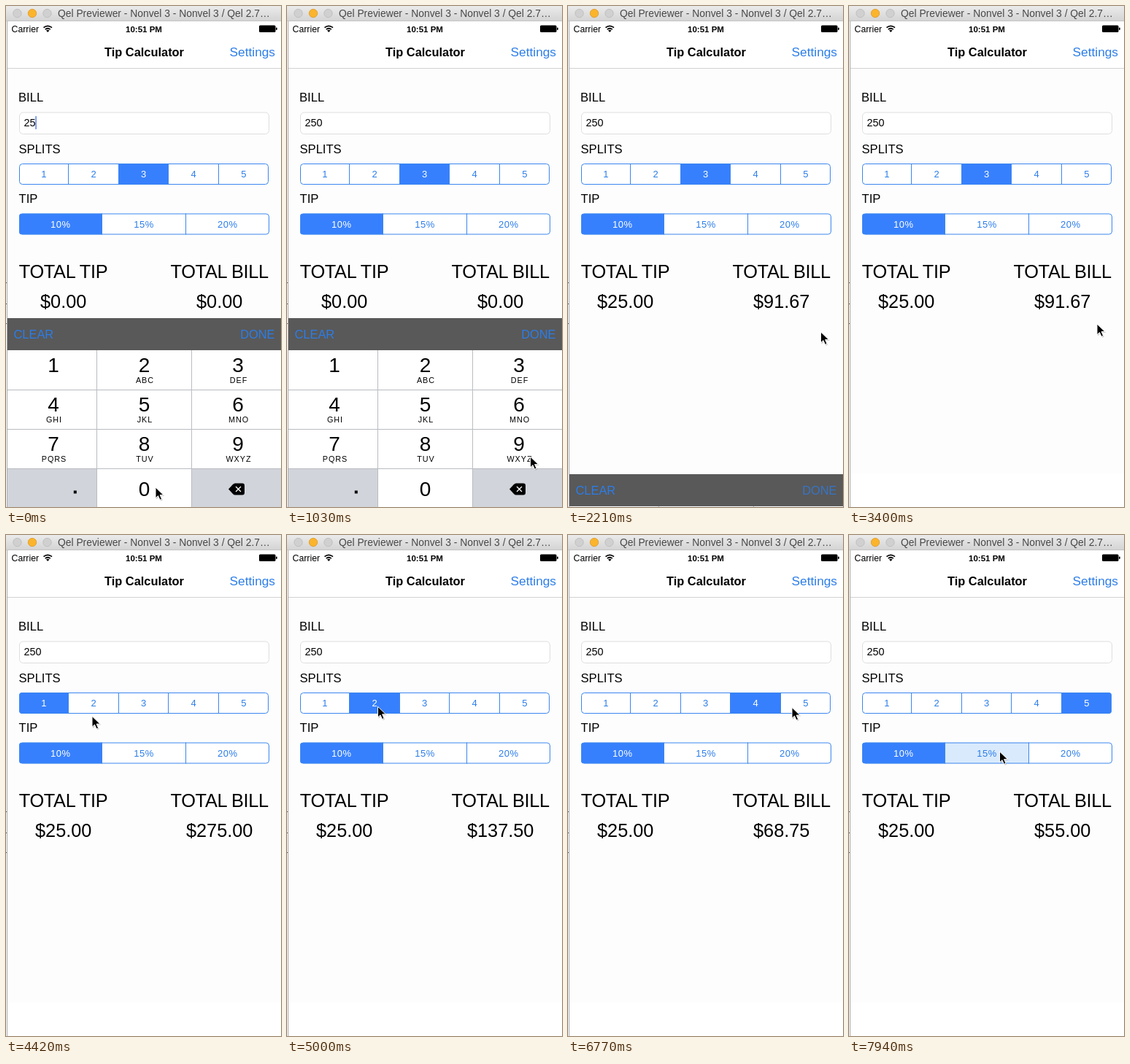
Write an HTML page that moves like this. It is 377 by 687 pixels and loops after 8000 ms.

```html
<!DOCTYPE html>
<html lang="en">
<head>
<meta charset="utf-8">
<title>Tip Calculator</title>
<style>
  html, body { margin: 0; width: 100%; height: 100%; overflow: hidden; background: #fff; }
  svg { display: block; width: 100%; height: 100%; font-family: "Liberation Sans", Arial, sans-serif; }
  .mid { text-anchor: middle; }
  .end { text-anchor: end; }
  .bold { font-weight: bold; }
  .blue { fill: #2b7de9; }
  .label { font-size: 16.6px; }
  .big { font-size: 25.3px; }
  .head { letter-spacing: -.3px; }
  .segment text { font-size: 13px; text-anchor: middle; }
  .digit { font-size: 28px; text-anchor: middle; }
  .letters { font-size: 10.8px; letter-spacing: 1px; text-anchor: middle; }
</style>
</head>
<body>
<svg viewBox="0 0 377 687">
  <defs>
    <linearGradient id="chrome" x2="0" y2="1">
      <stop stop-color="#ebebeb"/><stop offset="1" stop-color="#d3d3d3"/>
    </linearGradient>
    <clipPath id="clipSplits"><rect x="18" y="216" width="342" height="29" rx="4"/></clipPath>
    <clipPath id="clipTip"><rect x="18" y="284.500" width="343" height="29" rx="4"/></clipPath>
  </defs>

  <rect width="377" height="687" fill="#fff"/>
  <rect x="2" y="85" width="375" height="556" fill="#fdfdfd"/>
  <path d="M1.500 20V687" stroke="#a9a9a9"/>
  <path d="M0 379.500h1M0 408.500h1M0 435.500h1" stroke="#555"/>

  <rect width="377" height="21" fill="url(#chrome)"/>
  <path d="M0 20.500H377" stroke="#c4c4c4"/>
  <g stroke-width=".8">
    <circle cx="15.500" cy="10" r="5.700" fill="#d0d0d0" stroke="#b9b9b9"/>
    <circle cx="36" cy="10" r="5.700" fill="#fbb42c" stroke="#dc9a28"/>
    <circle cx="56.500" cy="10" r="5.700" fill="#d0d0d0" stroke="#b9b9b9"/>
  </g>
  <text x="71" y="15" font-size="13.850" fill="#484848">Qel Previewer - Nonvel 3 - Nonvel 3 / Qel 2.7…</text>

  <text x="7.500" y="35.500" font-size="12.300">Carrier</text>
  <g fill="none" stroke="#000" stroke-width="1.700">
    <path d="M51.500 29.700Q57.200 25 63 29.700M53.700 32.200Q57.200 29.300 60.800 32.200"/>
    <path d="M55 33.500Q57.200 31.900 59.500 33.500L57.200 36Z" fill="#000" stroke="none"/>
  </g>
  <text class="mid bold" x="189" y="35.500" font-size="11.500">10:51 PM</text>
  <rect x="347" y="26.500" width="22.500" height="9.500" rx="1.500"/>
  <rect x="370" y="29.500" width="1.700" height="3.500" rx=".8"/>

  <text class="mid bold" x="189.500" y="69" font-size="16.400">Tip Calculator</text>
  <text class="end blue" x="369" y="69" font-size="17.300">Settings</text>
  <path d="M2 85.500H377" stroke="#d2d2d2"/>

  <text class="label" x="17" y="131">BILL</text>
  <rect x="18.500" y="146" width="342" height="29.500" rx="5" fill="#fff" stroke="#dedede"/>
  <text id="bill" x="24.500" y="165.200" font-size="14.400"></text>
  <rect id="caret" y="151" width="1.500" height="18" fill="#5c83e6"/>

  <text class="label" x="17.500" y="201.700">SPLITS</text>
  <g class="segment" id="splits"></g>
  <text class="label" x="17.500" y="270">TIP</text>
  <g class="segment" id="tip" letter-spacing=".5"></g>

  <text class="big head mid" x="78.500" y="372.700">TOTAL TIP</text>
  <text class="big head mid" x="292.700" y="372.700">TOTAL BILL</text>
  <text class="big mid" id="totalTip" x="78.700" y="414"></text>
  <text class="big mid" id="totalBill" x="292.700" y="414"></text>

  <g id="keyboard">
    <rect x="2" y="428" width="375" height="44" fill="#595959"/>
    <text class="blue" x="10.500" y="456.300" font-size="16.400">CLEAR</text>
    <text class="end blue" id="done" x="368.500" y="456.300" font-size="16.400">DONE</text>
    <g id="keys"></g>
    <path d="M2 526.500H377M2 580.500H377M2 634.500H377M124.500 472V687M254.500 472V687" stroke="#b9bcc1"/>
    <g id="keyText"></g>
    <rect x="92.800" y="664.500" width="4" height="4"/>
    <path d="M305 662.500l6-6.500q1.500-1.500 3-1.500h10q3 0 3 3v10q0 3-3 3h-10q-1.500 0-3-1.500z"/>
    <path d="M315 659l7 7m0-7l-7 7" stroke="#fff" stroke-width="1.300"/>
  </g>

  <g id="pointer">
    <path d="M1 1.500v15l3.600-3.300 2.500 5.600 2.700-1.200-2.400-5.500h5z" fill="#000" opacity=".2"/>
    <path d="M0 0v14.800l3.500-3.200 2.500 5.700 2.600-1.100-2.500-5.600h4.900z" fill="#000" stroke="#fff" stroke-width="1"/>
  </g>
</svg>
<script>
const LOOP = 8000, TICK = 147.1, LEAD = 8;
const BLUE = "#3780fd", PALE = "#d9eafd", WHITE = "#fff", GREY = "#d1d5db";
const byId = id => document.getElementById(id);

function add(parent, tag, attrs, text = "") {
  const node = document.createElementNS("http://www.w3.org/2000/svg", tag);
  for (const key in attrs) node.setAttribute(key, attrs[key]);
  node.textContent = text;
  return parent.appendChild(node);
}

// Segmented control: edges bound the cells; returns a painter.
function segmented(id, clip, edges, top, labels) {
  const group = byId(id), left = edges[0], right = edges[edges.length - 1];
  const fills = add(group, "g", { "clip-path": `url(#${clip})` });
  const cells = labels.map((label, i) => ({
    box: add(fills, "rect", { x: edges[i], y: top, width: edges[i + 1] - edges[i], height: 29 }),
    text: add(group, "text", { x: (edges[i] + edges[i + 1]) / 2, y: top + 19 }, label)
  }));
  const line = { fill: "none", stroke: "#3b86ee" };
  add(group, "rect", { x: left + .5, y: top + .5, width: right - left - 1, height: 28, rx: 4, ...line });
  add(group, "path", { d: edges.slice(1, -1).map(x => `M${x} ${top}v29`).join(""), ...line });
  return (selected, pressed) => cells.forEach(({ box, text }, i) => {
    box.setAttribute("fill", i === selected ? BLUE : i === pressed ? PALE : WHITE);
    text.setAttribute("fill", i === selected ? WHITE : "#2b7de9");
  });
}

const paintSplits = segmented("splits", "clipSplits", [18, 85.5, 154.5, 222.5, 291.5, 360], 216, [1, 2, 3, 4, 5]);
const paintTip = segmented("tip", "clipTip", [18, 131.5, 246.5, 361], 284.5, ["10%", "15%", "20%"]);

const columns = [[2, 122.5, 65], [124.5, 130, 189.5], [254.5, 122.5, 318]];
const letters = ["", "ABC", "DEF", "GHI", "JKL", "MNO", "PQRS", "TUV", "WXYZ"];
const keyBoxes = Array.from({ length: 12 }, (_, i) => {
  const [x, width, center] = columns[i % 3], y = 472 + 54 * Math.floor(i / 3);
  if (i < 9) {
    add(byId("keyText"), "text", { class: "digit", x: center, y: y + 30 }, i + 1);
    add(byId("keyText"), "text", { class: "letters", x: center + 1, y: y + 45 }, letters[i]);
  }
  return add(byId("keys"), "rect", { x, y, width, height: 54, fill: i === 9 || i === 11 ? GREY : WHITE });
});
add(byId("keyText"), "text", { class: "digit", x: 189.5, y: 671.5 }, 0);

// All tracks are [tick, value...].
const path = [
  [0, 205, 660], [3, 206, 660], [7, 333.5, 618], [8, 338, 602], [11, 345, 462], [12, 346.5, 447],
  [22, 346.5, 447], [23, 340, 436], [24, 270, 355], [25, 130, 268], [26, 57, 238], [28, 55, 235],
  [30, 118, 248.5], [31, 120, 239], [33, 121, 235], [37, 135, 236], [39, 161, 232], [41, 167, 232],
  [43, 226, 235], [45, 245, 235], [46, 307, 236.5], [48, 314, 235], [50, 288, 252],
  [53, 211, 292], [54, 206.5, 297]
];
const splitTrack = [[0, 3], [28, 1], [33, 2], [41, 3], [45, 4], [48, 5]];
const pressTrack = { 27: 1, 32: 2, 40: 3, 44: 4, 47: 5 };
const slideTrack = [[0, 0], [15, 214], [16, 252], [17, 300]];
const doneTrack = [[0, 1], [13, .3], [15, .75]];

const held = (track, tick) => track.filter(([at]) => at <= tick).pop()[1];
const money = value => "$" + value.toFixed(2);

function pointerAt(tick) {
  const next = path.findIndex(([at]) => at > tick);
  if (next < 0) return path[path.length - 1].slice(1);
  const [t0, x0, y0] = path[next - 1], [t1, x1, y1] = path[next];
  const k = (tick - t0) / (t1 - t0);
  return [x0 + (x1 - x0) * k, y0 + (y1 - y0) * k];
}

function draw(time) {
  const tick = Math.min(54, Math.floor((time + LEAD) / TICK));
  const typed = tick >= 2, submitted = tick >= 15;
  const splits = held(splitTrack, tick);

  byId("bill").textContent = typed ? "250" : "25";
  byId("caret").setAttribute("x", typed ? 48.5 : 40.3);
  byId("caret").style.opacity = tick < 5 || (tick >= 9 && tick < 12) ? 1 : 0;
  keyBoxes[10].setAttribute("fill", tick === 1 || tick === 2 ? GREY : WHITE);

  paintSplits(splits - 1, (pressTrack[tick] || 0) - 1);
  paintTip(0, tick === 54 ? 1 : -1);
  byId("totalTip").textContent = money(submitted ? 25 : 0);
  byId("totalBill").textContent = money(submitted ? 275 / splits : 0);

  byId("keyboard").setAttribute("transform", `translate(0 ${held(slideTrack, tick)})`);
  byId("done").style.opacity = held(doneTrack, tick);
  byId("pointer").setAttribute("transform", `translate(${pointerAt(tick)})`);
}

const start = performance.now();
function frame() {
  draw((performance.now() - start) % LOOP);
  requestAnimationFrame(frame);
}
frame();
</script>
</body>
</html>
```
